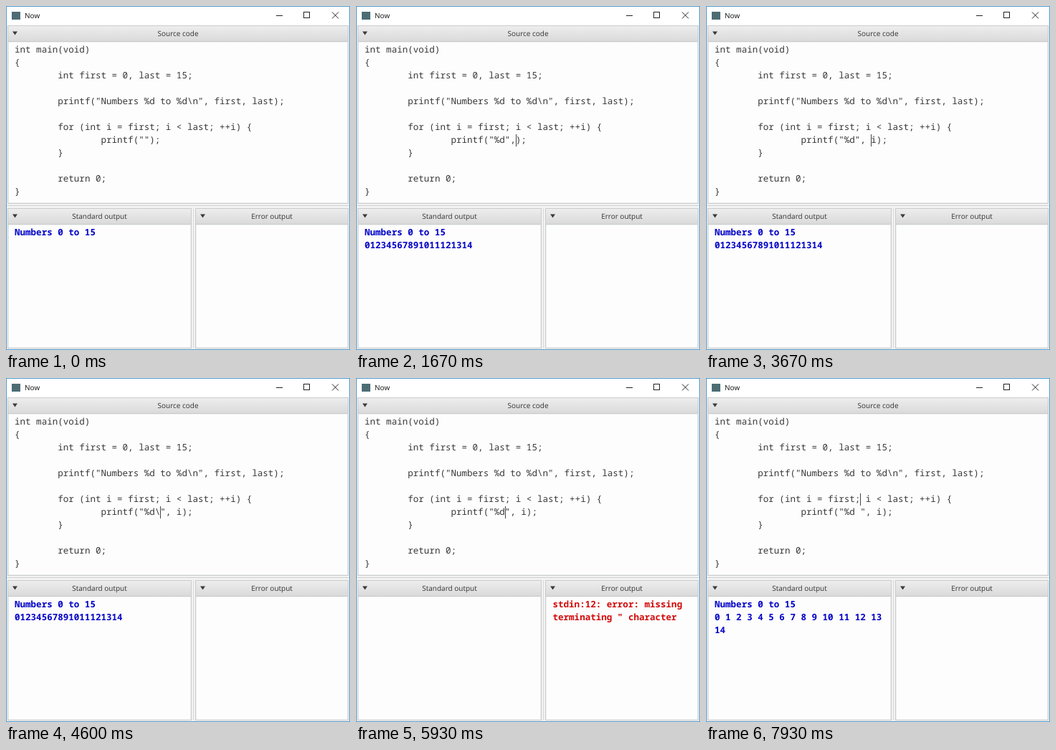
Write an HTML page with a canvas that moves like this. It is 480 px wide and 480 px high and loops after 8 s.

```html
<!DOCTYPE html>
<html lang="en">
<head>
<meta charset="utf-8">
<title>Live code editor</title>
<style>
  html, body { margin: 0; width: 100%; height: 100%; overflow: hidden; background: #fff; }
  canvas { display: block; }
</style>
</head>
<body>
<canvas id="stage" width="480" height="480"></canvas>
<script>
const ctx = document.getElementById('stage').getContext('2d');
const LOOP = 8000;
const BLINK = 500;
const CHAR = 7.53;
const LINE = 18;
const LEFT = 12;
const MONO = '12.55px "Noto Sans Mono", "DejaVu Sans Mono", monospace';
const UI = '10px "Open Sans", "Noto Sans", sans-serif';
const BLUE = '#0505c8';
const RED = '#d20a0a';

// Each edit: time, format string, trailing arguments, caret column, caret row.
const edits = [
  [0, '', '', 24, 7],
  [70, '%', '', 25, 7],
  [600, '%d', '', 26, 7],
  [1330, '%d', '', 27, 7],
  [1670, '%d', ',', 28, 7],
  [2070, '%d', ', ', 29, 7],
  [2270, '%d', ', i', 30, 7],
  [3670, '%d', ', i', 29, 7],
  [3870, '%d', ', i', 28, 7],
  [4000, '%d', ', i', 27, 7],
  [4130, '%d', ', i', 26, 7],
  [4600, '%d\\', ', i', 27, 7],
  [4930, '%d\\n', ', i', 28, 7],
  [5470, '%d\\', ', i', 27, 7],
  [5870, '%d', ', i', 26, 7],
  [6400, '%d ', ', i', 27, 7],
  [7870, '%d ', ', i', 27, 6]
];

const heading = 'Numbers 0 to 15';
const numbers = [...Array(15).keys()];
const joined = { out: [heading, numbers.join('')] };
const listed = { out: [heading, ...numbers.map(String)] };
const spaced = { out: [heading, numbers.slice(0, 14).join(' '), '14'] };
const noIdentifier = { err: ['stdin:8: error:', 'identifier expected'] };
const noQuote = { err: ['stdin:12: error: missing', 'terminating " character'] };

const results = [
  [0, { out: [heading] }],
  [800, joined],
  [1800, noIdentifier],
  [2530, joined],
  [4800, noQuote],
  [5180, listed],
  [5670, noQuote],
  [6130, joined],
  [6650, spaced]
];

const latest = (list, t) => list.filter(entry => entry[0] <= t).pop();

function rect(x, y, w, h, color) {
  ctx.fillStyle = color;
  ctx.fillRect(x, y, w, h);
}

function stroke(color, ...segments) {
  ctx.strokeStyle = color;
  ctx.lineWidth = 1;
  ctx.beginPath();
  for (const [x1, y1, x2, y2] of segments) {
    ctx.moveTo(x1, y1);
    ctx.lineTo(x2, y2);
  }
  ctx.stroke();
}

function text(value, x, y, font, color, align = 'left') {
  ctx.font = font;
  ctx.fillStyle = color;
  ctx.textAlign = align;
  ctx.fillText(value, x, y);
}

function lines(rows, x, y, font, color) {
  rows.forEach((row, i) => {
    const body = row.trimStart();
    text(body, x + (row.length - body.length) * CHAR, y + i * LINE, font, color);
  });
}

function pane(x, y, w, h, title) {
  rect(x, y, w, h, '#cbcbcb');
  const shade = ctx.createLinearGradient(0, y, 0, y + 22);
  shade.addColorStop(0, '#eeeeee');
  shade.addColorStop(1, '#dadada');
  rect(x + 1, y + 1, w - 2, 21, shade);
  rect(x + 1, y + 23, w - 2, h - 24, '#eef0f1');
  rect(x + 2, y + 24, w - 4, h - 26, '#fdfdfd');
  ctx.fillStyle = '#3a3a3a';
  ctx.beginPath();
  ctx.moveTo(x + 7, y + 8.5);
  ctx.lineTo(x + 14, y + 8.5);
  ctx.lineTo(x + 10.5, y + 13.5);
  ctx.fill();
  text(title, x + w / 2, y + 15, UI, '#333', 'center');
}

function drawWindow() {
  rect(0, 0, 480, 480, '#f3f3f3');
  rect(0, 0, 480, 27, '#fff');
  rect(8, 8, 12, 11, '#4d6d75');
  text('Now', 26, 17, UI, '#111');
  stroke('#222', [377, 13.5, 386, 13.5]);
  ctx.strokeRect(415.5, 8.5, 8, 8);
  stroke('#222', [455, 8.5, 464, 17.5], [464, 8.5, 455, 17.5]);
  pane(2, 27, 476, 249, 'Source code');
  rect(1, 278, 478, 1, '#d0d0d0');
  pane(2, 282, 257, 196, 'Standard output');
  rect(261, 282, 1, 196, '#d8d8d8');
  pane(264, 282, 214, 196, 'Error output');
  ctx.strokeStyle = '#4f9bcc';
  ctx.strokeRect(0.5, 0.5, 479, 479);
}

function drawCode(t) {
  const [since, format, args, column, row] = latest(edits, t);
  const tab = ' '.repeat(8);
  lines([
    'int main(void)',
    '{',
    tab + 'int first = 0, last = 15;',
    '',
    tab + 'printf("Numbers %d to %d\\n", first, last);',
    '',
    tab + 'for (int i = first; i < last; ++i) {',
    tab + tab + `printf("${format}"${args});`,
    tab + '}',
    '',
    tab + 'return 0;',
    '}'
  ], LEFT, 65, MONO, '#383838');
  const hidden = since === 0 || Math.floor((t - since) / BLINK) % 2;
  if (!hidden) {
    rect(Math.round(LEFT + column * CHAR), 53 + row * LINE, 1, 17, '#444');
  }
}

function drawResult(t) {
  const { out = [], err = [] } = latest(results, t)[1];
  ctx.save();
  ctx.beginPath();
  ctx.rect(4, 306, 472, 170);
  ctx.clip();
  lines(out, LEFT, 320, 'bold ' + MONO, BLUE);
  lines(err, 274.5, 320, 'bold ' + MONO, RED);
  ctx.restore();
}

function frame() {
  const t = performance.now() % LOOP;
  ctx.textRendering = 'geometricPrecision';
  drawWindow();
  drawCode(t);
  drawResult(t);
  requestAnimationFrame(frame);
}
frame();
</script>
</body>
</html>
```
